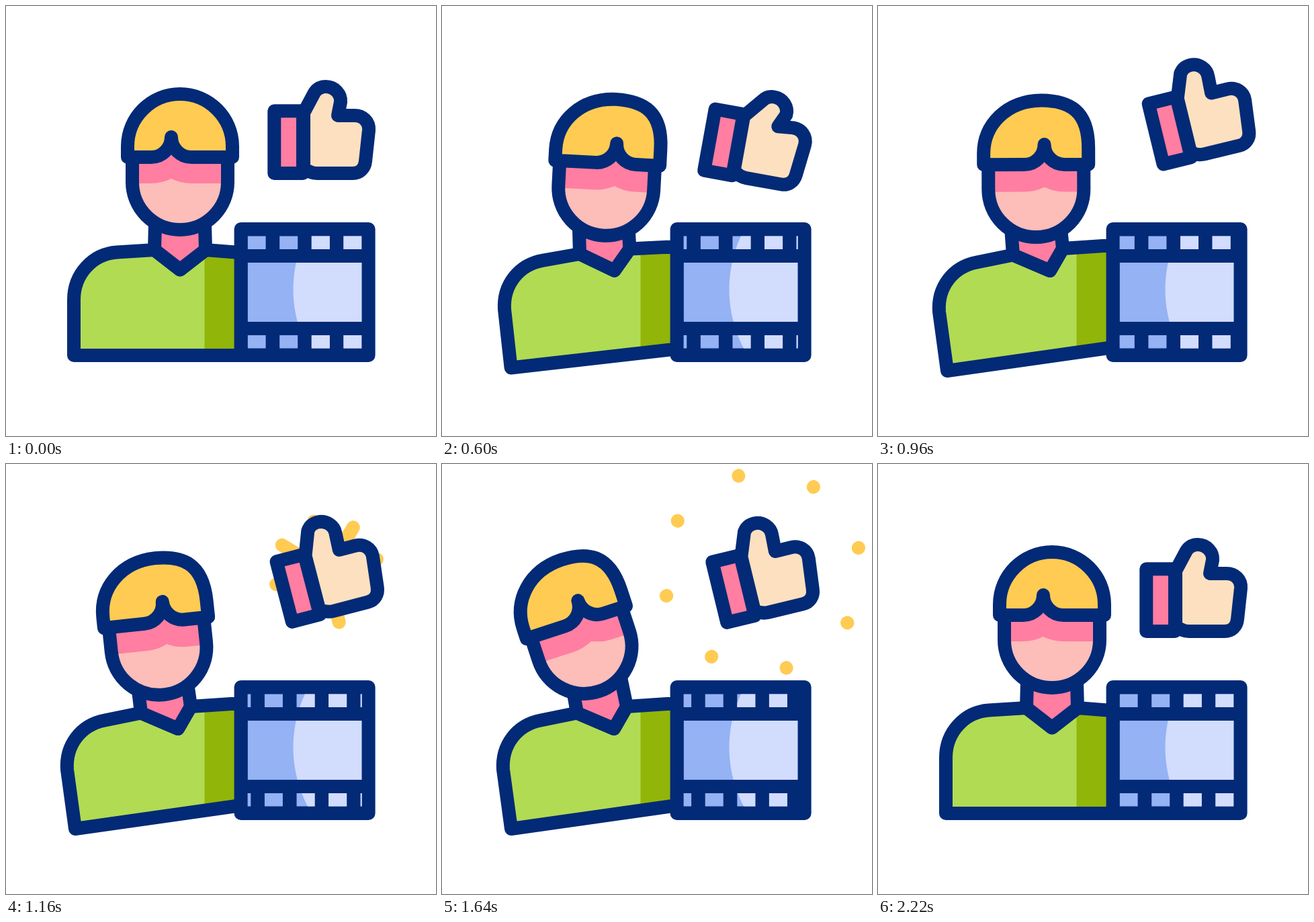
Write an HTML page with a canvas that moves like this. It is 640 px wide and 640 px high and loops after 2.4 s.

```html
<!DOCTYPE html>
<html>
<head>
<meta charset="utf-8">
<style>
  html, body { margin: 0; width: 100%; height: 100%; overflow: hidden; background: #fff; }
  canvas { display: block; }
</style>
</head>
<body>
<canvas width="640" height="640"></canvas>
<script>
const ctx = document.querySelector('canvas').getContext('2d');
const LOOP = 2400;
const NAVY = '#032a76', YELLOW = '#ffcb52', PINK = '#ff7ea1', SKIN = '#fdbdb9', HAND = '#fde0bf';
const BLUE = '#94b2f4', PALE = '#d2dcfd';
const RAD = Math.PI / 180;

const shirt = ctx.createLinearGradient(295, 0, 296, 0);
shirt.addColorStop(0, '#b1db53');
shirt.addColorStop(1, '#91b509');

const clamp = v => Math.min(1, Math.max(0, v));
const mix = (a, b, k) => a + (b - a) * k;

function ease(t, from, to) {
  const u = clamp((t - from) / (to - from));
  return u * u * (3 - 2 * u);
}

// Gentler ease for the film: cubic-bezier(.17, 0, .8, 1)
function filmEase(u) {
  let lo = 0, hi = 1;
  for (let i = 0; i < 24; i++) {
    const s = (lo + hi) / 2, r = 1 - s;
    if (3 * r * r * s * .17 + 3 * r * s * s * .8 + s * s * s < u) lo = s; else hi = s;
  }
  return lo * lo * (3 - 2 * lo);
}

function shape(d, fill) {
  const path = new Path2D(d);
  ctx.fillStyle = fill;
  ctx.fill(path);
  ctx.stroke(path);
}

function drawPerson(t) {
  const lean = ease(t, 200, 760) - ease(t, 1660, 2200);
  const turn = ease(t, 200, 600) - ease(t, 1720, 2200);
  const tilt = 3.1 * ease(t, 200, 640) - 21.5 * ease(t, 720, 1700) + 18.4 * ease(t, 1700, 2200);
  const pt = (x0, y0, x1, y1) => `${mix(x0, x1, lean)} ${mix(y0, y1, lean)} `;

  const collarLeft = pt(221, 363, 201, 370.5);
  const collarTip = pt(259, 392.5, 256, 394);
  const collarRight = pt(297, 363, 275, 361);
  shape('M' + pt(101, 520, 103, 543) + 'L' + pt(101, 437, 91, 455) +
    'C' + pt(101, 399, 88.5, 418.5) + pt(129, 369, 111, 388.5) + pt(165, 366.5, 147, 381.5) +
    'L' + collarLeft + collarTip + collarRight + pt(335, 366, 335, 357) +
    pt(350, 367, 350, 357) + pt(350, 520, 350, 508) + 'Z', shirt);

  // Head turns around the base of the neck
  const angle = tilt * RAD, cos = Math.cos(angle), sin = Math.sin(angle);
  const x = 259 - 23.5 * lean + 114 * sin;
  const y = 339 + 11 * lean - .018 * tilt * tilt - 114 * cos;
  const neckTop = side => `${x + side * 37 * cos - 100 * sin} ${y + side * 37 * sin + 100 * cos} `;
  shape('M' + neckTop(-1) + 'L' + collarLeft + collarTip + collarRight + neckTop(1), PINK);

  ctx.save();
  ctx.translate(x, y);
  ctx.rotate(angle);
  const n = mix(-13, 12.4, turn);
  const face = 'M-71-20V37A71 71 0 0 0 71 37V-20';
  ctx.save();
  ctx.clip(new Path2D(face));
  ctx.fillStyle = SKIN;
  ctx.fillRect(-80, -30, 160, 150);
  ctx.fillStyle = PINK;
  const shade = mix(39, 40.5, turn);
  ctx.fill(new Path2D(`M-75-20H75V${shade}H${n + 30}A69 69 0 0 1 ${n} ${shade - 7}` +
    `A69 69 0 0 1 ${n - 30} ${shade}H-75Z`));
  ctx.restore();
  ctx.stroke(new Path2D(face));

  const m = (a, b) => mix(a, b, turn) + ' ';
  shape('M-78 0V-16C-78 ' + m(-59, -60) + '-43 ' + m(-94, -95) + m(0, 8) + m(-94, -95.5) +
    'C' + m(43, 50) + m(-94, -95) + '78 ' + m(-59, -80) + '78 ' + m(-16, -25) +
    `V0H${n + 30}A30 30 0 0 1 ${n} -30A30 30 0 0 1 ${n - 30} 0Z`, YELLOW);
  ctx.restore();
}

function drawFilm(t) {
  ctx.save();
  ctx.translate(-.4, 0);
  ctx.fillStyle = NAVY;
  ctx.beginPath();
  ctx.roundRect(340, 322, 210, 208, 10);
  ctx.fill();

  const pitch = 47.6;
  const shift = 3 * pitch * filmEase(clamp((t - 200) / 2000)) % pitch;
  ctx.beginPath();
  ctx.rect(360, 382, 170, 88);
  for (let i = 0; i < 5; i++) {
    const x = 360 - shift + i * pitch;
    ctx.rect(x, 342.5, 27, 19.5);
    ctx.rect(x, 490, 27, 19.5);
  }
  ctx.clip();
  ctx.fillStyle = BLUE;
  ctx.fillRect(360, 340, 170, 172);
  ctx.fillStyle = PALE;
  ctx.fill(new Path2D('M445 343A190 190 0 0 0 449.6 510H530V342H445Z'));
  ctx.restore();
}

function drawRays(t) {
  const reach = 147.5;
  const outer = reach * ease(t, 755, 1540), inner = reach * ease(t, 1000, 1660);
  if (outer - inner < .1) return;
  ctx.strokeStyle = YELLOW;
  ctx.beginPath();
  for (let i = 0; i < 8; i++) {
    const a = (45 * i - 14) * RAD, c = Math.cos(a), s = Math.sin(a);
    ctx.moveTo(477 + inner * c, 160.5 + inner * s);
    ctx.lineTo(477 + outer * c, 160.5 + outer * s);
  }
  ctx.stroke();
  ctx.strokeStyle = NAVY;
}

function drawThumb(t) {
  const wind = ease(t, 200, 570), up = ease(t, 570, 1010), back = ease(t, 1570, 2030);
  const bend = wind - ease(t, 570, 900), stretch = up - back;
  const tip = (x, y) => `${x + 7 * bend - 3 * stretch} ${y + 3 * bend - 5 * stretch} `;
  ctx.save();
  ctx.translate(420.7 - 1.5 * wind + 15.8 * up - 14.3 * back, 203 + .5 * wind - 18.5 * up + 18 * back);
  ctx.rotate((10.6 * wind - 25.2 * up + 14.6 * back) * RAD);
  ctx.translate(-420.7, -203);
  shape('M443 159L' + tip(459, 129) + 'Q' + tip(465, 120) + tip(476, 120) +
    'C' + tip(489, 120) + tip(499, 131) + tip(498, 143) +
    `L${494 + 2 * bend} ${163 + 2 * bend}L519 163C531 163 541 172 540 185` +
    'L535 231C534 242 526 249 516 249H463Q452 249 443 241Z', HAND);
  shape('M399.3 156.3H442V249H399.3Z', PINK);
  ctx.restore();
}

function draw(now) {
  const t = now % LOOP;
  ctx.fillStyle = '#fff';
  ctx.fillRect(0, 0, 640, 640);
  ctx.strokeStyle = NAVY;
  ctx.lineWidth = 20;
  ctx.lineCap = ctx.lineJoin = 'round';
  drawPerson(t);
  drawFilm(t);
  drawRays(t);
  drawThumb(t);
}

let start;
function tick(now) {
  start ??= now;
  draw(now - start);
  requestAnimationFrame(tick);
}
requestAnimationFrame(tick);
</script>
</body>
</html>
```
